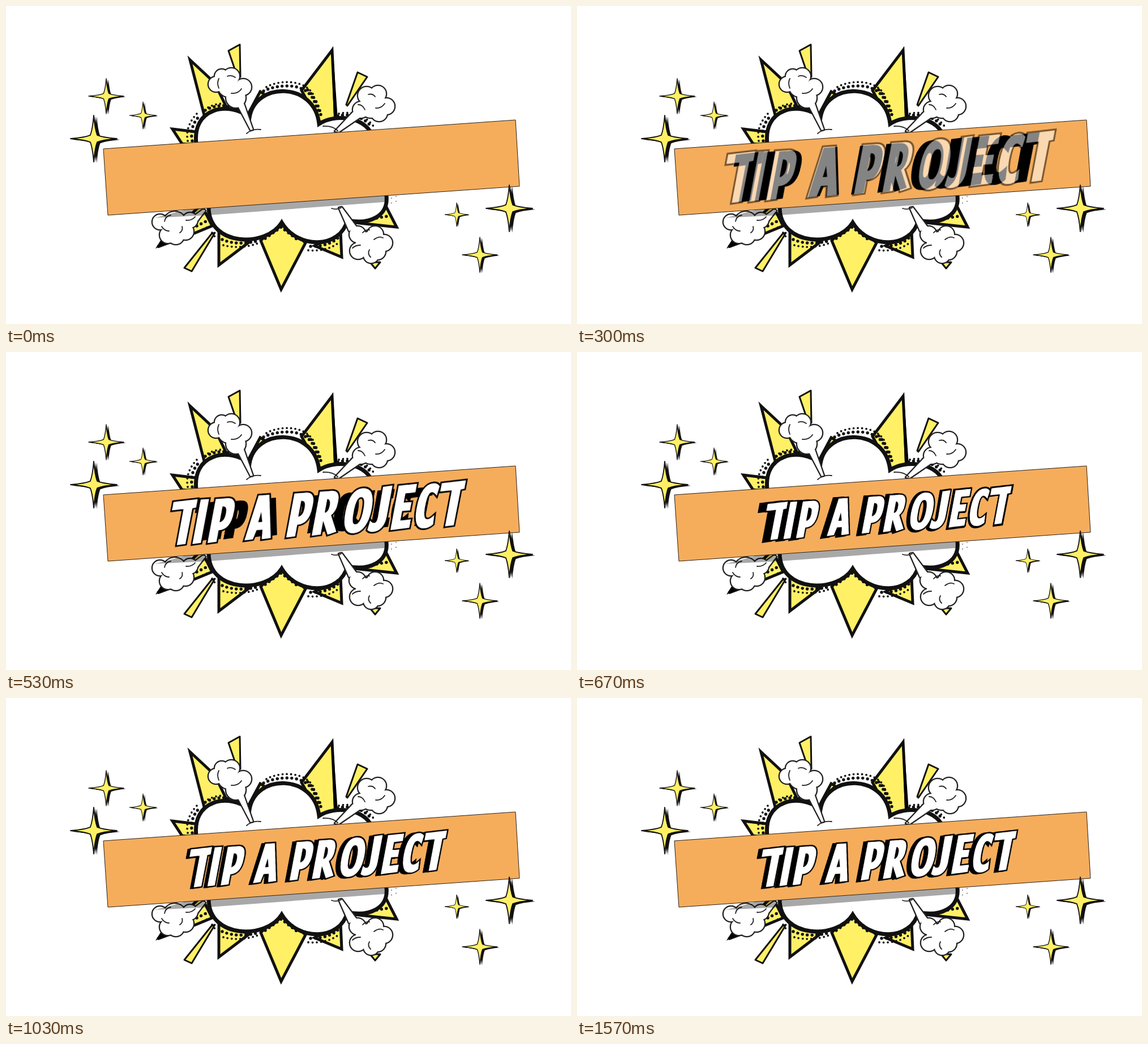
Write an HTML page that moves like this. It is 998 px wide and 561 px high and loops after 5.01 s.

```html
<!DOCTYPE html>
<html lang="en">
<head>
<meta charset="utf-8">
<title>Tip a project</title>
<style>
html, body { margin: 0; width: 100%; height: 100%; overflow: hidden; background: #fff; }
svg { position: absolute; left: 0; top: 0; width: 100%; height: 100%; }
/* selectable text under the drawn lettering */
h1 { position: absolute; left: 327px; top: 262px; margin: 0; color: transparent; font: 900 italic 46px/1 "Liberation Sans", sans-serif; white-space: nowrap; rotate: -4deg; }

.spike { fill: #fff065; stroke: #111; stroke-width: 5; }
.stick { fill: #fff065; stroke: #111; stroke-width: 3; stroke-linejoin: round; }
.dots { fill: none; stroke: #111; stroke-width: 5.4; stroke-linecap: round; stroke-dasharray: 0 8.5; }
.small { stroke-width: 3.8; stroke-dasharray: 0 7.5; }
.thin { fill: none; stroke: #222; stroke-width: 1.8; stroke-linecap: round; }
.line { fill: #222; stroke: #222; stroke-width: 4.6; stroke-linejoin: round; }
.body { fill: #fff; }
.star { fill: #fff065; stroke: #111; stroke-width: .045; stroke-linejoin: round; }
.drop { fill: #111; }

.edge { stroke: #000; stroke-width: 8; }
.face { fill: #fff; stroke: #fff; stroke-width: 2; }
.pop { animation: pop 5010ms 15ms infinite backwards; }
.back { animation: fadeBack 5010ms linear infinite; }
.front { animation: fadeFront 5010ms linear infinite; }
.front .pop { animation-delay: 215ms; }

/* drop in, overshoot, settle */
@keyframes pop {
  0% { transform: scale(1.04); animation-timing-function: ease-in; }
  3.99% { transform: scale(1); animation-timing-function: cubic-bezier(.4, .2, .8, .75); }
  6.59% { transform: scale(.91); animation-timing-function: linear; }
  7.98% { transform: scale(.816); animation-timing-function: ease-out; }
  10.58% { transform: scale(.74); animation-timing-function: ease-in-out; }
  12.57% { transform: scale(.79); animation-timing-function: ease-out; }
  16.57% { transform: scale(.808); animation-timing-function: ease-in-out; }
  21.4% { transform: scale(.799); animation-timing-function: ease-in-out; }
  27.4%, 100% { transform: scale(.8); }
}
@keyframes fadeBack {
  0%, .6% { opacity: 0; }
  3.3%, 100% { opacity: 1; }
}
@keyframes fadeFront {
  0%, 4.6% { opacity: 0; }
  7.3%, 100% { opacity: 1; }
}
</style>
</head>
<body>
<h1>TIP A PROJECT</h1>
<svg viewBox="0 0 998 561" role="img" aria-label="TIP A PROJECT">
  <defs>
    <path id="spark" d="M0-1Q.05-.4 .15-.15Q.4-.05 1 0Q.4 .05 .15 .15Q.05 .4 0 1Q-.05 .4-.15 .15Q-.4 .05-1 0Q-.4-.05-.15-.15Q-.05-.4 0-1Z"/>
    <g id="star">
      <use href="#spark" class="drop" x=".13" y=".05"/>
      <use href="#spark" class="drop" x=".07" y=".03"/>
      <use href="#spark" class="star"/>
    </g>

    <path id="cloud" d="M337 250C324 176 398 168 430 197C440 133 545 133 553 208C580 190 632 195 645 225L672 335C676 372 640 386 603 378C590 429 515 429 487 382C460 426 358 425 358 355Z"/>

    <g id="puffA">
      <path d="M409 175L432 219L436 218L420 172Z"/>
      <circle cx="371" cy="138" r="13"/><circle cx="381" cy="124" r="12"/>
      <circle cx="398" cy="124" r="14"/><circle cx="419" cy="143" r="14"/>
      <circle cx="406" cy="162" r="17"/><circle cx="393" cy="142" r="18"/>
    </g>
    <g id="puffB">
      <path d="M613 187L581 221L588 222L626 196Z"/>
      <circle cx="627" cy="183" r="14"/><circle cx="637" cy="158" r="15"/>
      <circle cx="657" cy="155" r="14"/><circle cx="672" cy="177" r="14"/>
      <circle cx="659" cy="189" r="14"/><circle cx="645" cy="177" r="20"/>
    </g>
    <g id="puffC">
      <path d="M330 372L348 359L352 361L336 382Z"/>
      <circle cx="272" cy="381" r="13"/><circle cx="286" cy="404" r="14"/>
      <circle cx="300" cy="406" r="14"/><circle cx="317" cy="398" r="14"/>
      <circle cx="325" cy="378" r="13"/><circle cx="298" cy="383" r="20"/>
    </g>
    <g id="puffD">
      <path d="M606 397L588 356L593 355L620 391Z"/>
      <circle cx="622" cy="432" r="14"/><circle cx="645" cy="440" r="13"/>
      <circle cx="656" cy="433" r="14"/><circle cx="668" cy="418" r="14"/>
      <circle cx="652" cy="403" r="14"/><circle cx="621" cy="403" r="14"/>
      <circle cx="638" cy="419" r="20"/>
    </g>
    <g id="puffs">
      <use href="#puffA"/><use href="#puffB"/><use href="#puffC"/><use href="#puffD"/>
    </g>
    <clipPath id="art">
      <use href="#cloud"/>
      <path d="M262 374L345 352L359 375L330 392L262 392Z"/>
    </clipPath>

    <path id="T" d="M-288-41L-244-43V-29L-251-28L-251.5 39L-266 40V-28L-288-27Z"/>
    <path id="P" fill-rule="evenodd" d="M0-41H19C34-42 39-33 38-14C38 8 30 18 15 17V39L0 40ZM14-28V4C22 4 25-2 25-13C25-24 22-28 14-28Z"/>
    <g id="words" transform="translate(12.5 0) skewX(-14.6)">
      <use href="#T"/>
      <path d="M-236-42H-222V39L-236 40Z"/>
      <use href="#P" x="-207"/>
      <path fill-rule="evenodd" d="M-125-42H-106L-88 39L-103 40L-105 22H-118L-122 39L-136 40ZM-115-16L-118 9H-108Z"/>
      <use href="#P" x="-56"/>
      <path fill-rule="evenodd" d="M-7-41H12C26-42 31-33 30-18C30-6 27 0 21 4L37 36L23 40L9 12H8V39L-7 40ZM8-28V0C14 0 17-5 17-14C17-24 14-28 8-28Z"/>
      <path fill-rule="evenodd" d="M74-42C90-42 98-28 98-2C98 26 88 41 73 41C57 41 50 27 50 1C50-26 58-42 74-42ZM74-27C66-27 64-16 64 1C64 18 66 26 73 26C81 26 84 16 84-2C84-18 81-27 74-27Z"/>
      <path d="M114-42L130-43V14C130 32 122 41 110 41C105 41 102 40 99 37L101 22C104 25 106 26 109 26C113 26 115 22 115 14Z"/>
      <path d="M144-42L177-43V-29L158-28V-9H173V5H158V25L178 24V38L144 40Z"/>
      <path d="M222-36L220-21C216-25 213-27 210-27C203-27 201-16 201 0C201 18 204 26 211 26C215 26 218 24 222 20L223 35C219 39 214 41 208 41C193 41 187 26 187 1C187-26 195-42 210-42C215-42 219-40 222-36Z"/>
      <use href="#T" x="515"/>
    </g>
  </defs>

  <g class="spike">
    <path d="M325 95L368 135L400 200L350 192Z"/>
    <path d="M576 78L582 202L553 205L522 149Z"/>
    <path d="M449 151L428 190L475 168Z"/>
    <path d="M294 217L336 222L334 245L311 243Z"/>
    <path d="M486 500L450 414L486 375L529 418Z"/>
    <path d="M376 457V398L430 416Z"/>
    <path d="M593 443L591 398L545 423Z"/>
    <path d="M690 390L672 355L605 381Z"/>
    <path d="M268 425L345 350L364 388L330 402Z"/>
  </g>
  <path d="M577 71L586 200H579L575 82Z"/>
  <path d="M264 428L274 412L286 418Z"/>
  <path class="stick" d="M643 452H661L652 463Z"/>

  <g class="dots">
    <path d="M455 150C480 138 535 131 547 175L559 197"/>
    <path d="M533 148C545 160 551 175 556 190"/>
    <path d="M352 184C370 173 400 173 420 184"/>
    <path d="M329 238C325 220 331 206 340 196"/>
    <path d="M436 178L455 157"/>
    <path d="M586 194C610 188 635 198 645 213"/>
    <path d="M458 410L486 390L517 414"/>
    <path d="M382 412C400 420 425 420 445 414"/>
    <path d="M538 424C560 424 580 418 590 405"/>
    <path d="M337 388L353 380"/>
    <path d="M655 374L673 371"/>
  </g>
  <g class="dots small">
    <path d="M460 143C480 131 525 128 542 155"/>
    <path d="M321 238C317 218 326 202 337 190"/>
    <path d="M357 179C372 170 398 170 412 178"/>
    <path d="M588 190C612 184 638 194 651 215"/>
    <path d="M384 422C402 427 428 426 446 418"/>
    <path d="M534 431C558 433 580 426 590 415"/>
    <path d="M341 397L356 390M364 400L371 410"/>
  </g>
  <path class="dots" style="stroke-width:1.6" d="M681 339V354M689 336V352"/>

  <use href="#cloud" fill="#fff" stroke="#111" stroke-width="7"/>

  <g class="stick">
    <path d="M393 79L413 68L414 125L406 117Z"/>
    <path d="M621 117L638 125L603 176L601 174Z"/>
    <path d="M315 462L328 468L369 400L363 402Z"/>
  </g>

  <use href="#puffs" class="line"/>
  <use href="#puffs" class="body"/>
  <path class="thin" d="M425 225Q435 216 450 218M560 212Q577 211 586 220M575 357Q584 360 592 356
    M376 128Q372 136 376 145M391 124Q398 121 405 126M398 154Q410 155 416 146
    M640 156Q648 154 652 160M653 180Q663 181 669 172M634 183Q630 174 622 174
    M280 380Q281 371 291 369M288 397Q280 397 275 389M307 400Q313 396 311 389M318 378Q328 379 334 372
    M626 422Q617 422 612 427M642 430Q638 437 644 443M650 412Q659 405 666 409M630 400Q635 394 642 395"/>

  <g clip-path="url(#art)">
    <path d="M180 369L672 334.500L680 345L358 369L258 374Z" fill="#000" opacity=".34"/>
  </g>

  <path d="M172 252L900 201L907 318L180 369Z" fill="#f5ad5c" stroke="#2b2118"/>

  <use href="#star" transform="translate(177 159) scale(31)"/>
  <use href="#star" transform="translate(242 193) scale(24)"/>
  <use href="#star" transform="translate(155 234) scale(41)"/>
  <use href="#star" transform="translate(889 357) scale(41)"/>
  <use href="#star" transform="translate(796 368) scale(21)"/>
  <use href="#star" transform="translate(837 439) scale(31)"/>

  <g class="back" transform="translate(537 287) rotate(-4)">
    <g class="pop"><use href="#words" class="edge"/></g>
  </g>
  <g class="front" transform="translate(543 286) rotate(-4)">
    <g class="pop">
      <use href="#words" class="edge"/>
      <use href="#words" class="face"/>
    </g>
  </g>
</svg>
</body>
</html>
```
